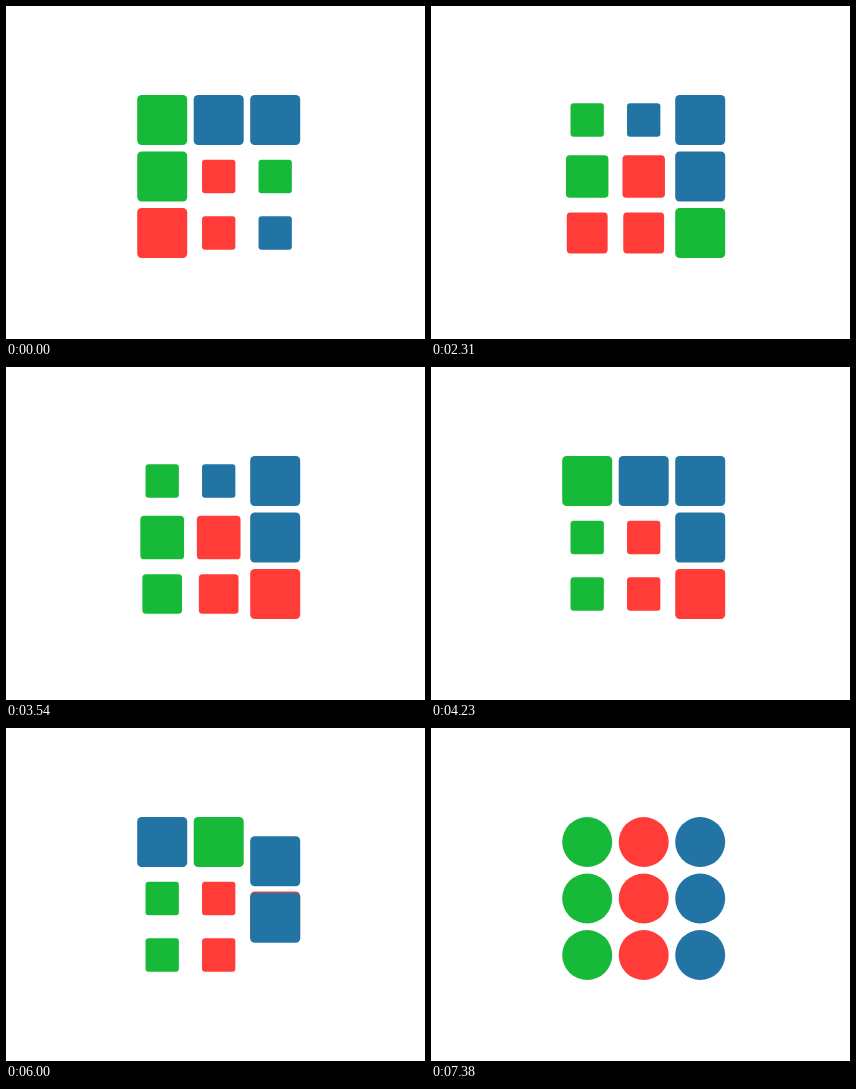
These frames come from a looping animation (419 px wide and 333 px high, 8 s). An HTML page with a canvas:

```html
<!DOCTYPE html>
<html lang="en">
<head>
<meta charset="utf-8">
<title>Sliding tiles</title>
<style>
  html, body { margin: 0; width: 100%; height: 100%; overflow: hidden; background: #fff; }
  canvas { display: block; }
</style>
</head>
<body>
<canvas id="stage" width="419" height="333"></canvas>
<script>
const ctx = document.getElementById('stage').getContext('2d');
const COLORS = { G: '#17ba38', R: '#ff3c38', B: '#2274a5' };
const LOOP = 8000, TICK = 30, STEP_TIME = 100;
const LEFT = 156.2, TOP = 114, PITCH = 56.5, SIZE = 50, CORNER = 4.5, SMALL = 2 / 3;
const WIN = { at: 7050, time: 320 };

const START = ['GBB', 'GRG', 'RRB'];

// Moves change the selected row and column; shifts rotate one line by one place.
const move = (at, row, col) => ({ at, cursor: { row, col } });
const shift = (at, axis, line, dir) => ({ at, axis, line, dir });
const EVENTS = [
  move(1088, 1, 0), move(1262, 1, 1), move(1416, 1, 2),
  shift(1778, 'col', 2, 1),
  move(2283, 2, 2),
  shift(2469, 'row', 2, -1), shift(2740, 'row', 2, -1),
  move(3504, 1, 2), move(4118, 0, 2),
  shift(4826, 'row', 0, 1),
  shift(5978, 'col', 2, 1), shift(6158, 'col', 2, 1), shift(6548, 'col', 2, -1),
  shift(6908, 'row', 0, -1)
];

const clamp = v => Math.min(1, Math.max(0, v));
const mix = (a, b, p) => a + (b - a) * p;
const wrap = i => (i + 3) % 3;

// The CSS "ease" curve, cubic-bezier(.25, .1, .25, 1).
function ease(x) {
  if (x <= 0 || x >= 1) return clamp(x);
  const bezier = (a, b, u) => 3 * a * u * (1 - u) ** 2 + 3 * b * u * u * (1 - u) + u ** 3;
  let low = 0, high = 1;
  for (let i = 0; i < 20; i++) {
    const mid = (low + high) / 2;
    if (bezier(.25, .25, mid) < x) low = mid; else high = mid;
  }
  return bezier(.1, 1, low);
}

function stateAt(time) {
  let grid = START.map(row => [...row]);
  let from = { row: 0, col: 0 }, to = from, moveP = 1, sliding = null;
  for (const event of EVENTS) {
    if (event.at > time) break;
    const p = ease((time - event.at) / STEP_TIME);
    if (event.cursor) {
      from = to;
      to = event.cursor;
      moveP = p;
      continue;
    }
    const { axis, line, dir } = event;
    grid = grid.map((cells, row) => cells.map((color, col) => {
      if (axis === 'row') return row === line ? cells[wrap(col - dir)] : color;
      return col === line ? grid[wrap(row - dir)][col] : color;
    }));
    sliding = { axis, line, dir, p };
  }
  return { grid, from, to, moveP, sliding };
}

function draw(time) {
  const { grid, from, to, moveP, sliding } = stateAt(time);
  const win = ease((time - WIN.at) / WIN.time);
  const scaleFor = (cursor, row, col) => cursor.row === row || cursor.col === col ? 1 : SMALL;

  ctx.fillStyle = '#fff';
  ctx.fillRect(0, 0, 419, 333);
  for (let row = 0; row < 3; row++) {
    for (let col = 0; col < 3; col++) {
      const place = { row, col };
      if (sliding && place[sliding.axis] === sliding.line) {
        const along = sliding.axis === 'row' ? 'col' : 'row';
        place[along] = mix(wrap(place[along] - sliding.dir), place[along], sliding.p);
      }
      const scale = mix(mix(scaleFor(from, row, col), scaleFor(to, row, col), moveP), 1, win);
      const size = SIZE * scale;
      const x = LEFT + place.col * PITCH - size / 2;
      const y = TOP + place.row * PITCH - size / 2;
      ctx.fillStyle = COLORS[grid[row][col]];
      ctx.beginPath();
      ctx.roundRect(x, y, size, size, mix(CORNER, SIZE / 2, win) * scale);
      ctx.fill();
    }
  }
}

const begin = performance.now();
function frame() {
  const time = (performance.now() - begin) % LOOP;
  draw(Math.floor(time / TICK) * TICK);
  requestAnimationFrame(frame);
}
frame();
</script>
</body>
</html>
```
